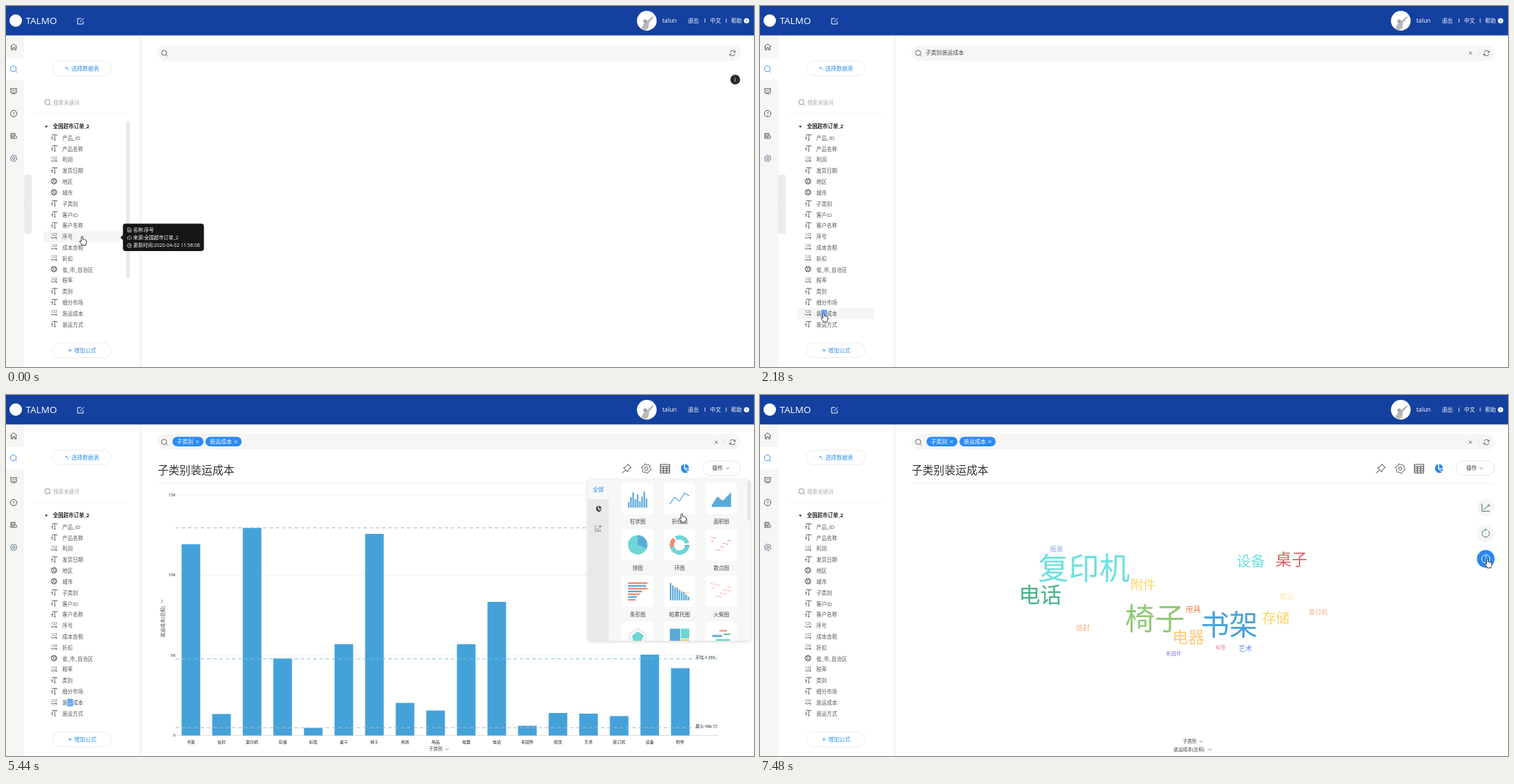
Write an HTML page that moves like this. It is 1076 by 520 pixels and loops after 7.87 s.

```html
<!DOCTYPE html>
<html>
<head>
<meta charset="utf-8">
<style>
html, body { margin: 0; width: 100%; height: 100%; overflow: hidden; background: #fff; }
svg { display: block; width: 100%; height: 100%; }
text { font-family: 'Open Sans', 'Noto Sans CJK SC', 'Noto Sans CJK', sans-serif; white-space: pre; }
</style>
</head>
<body>
<svg id="stage" viewBox="0 0 1076 520" preserveAspectRatio="none"></svg>
<script>
const LOOP = 7870, BLUE = '#2a86f0', BAR = '#45a2d9', INK = '#444', PALE = '#f7f6f5';

// Markup helpers; text is placed by its visual middle.
const text = (x, y, s, size, fill = '#333', extra = '') =>
  `<text x="${x}" y="${y + size * .37}" font-size="${size}" fill="${fill}" ${extra}>${s}</text>`;
const mid = (x, y, s, size, fill, extra = '') => text(x, y, s, size, fill, 'text-anchor="middle" ' + extra);
const rect = (x, y, w, h, fill, r = 0, extra = '') =>
  `<rect x="${x}" y="${y}" width="${w}" height="${h}" rx="${r}" fill="${fill}" ${extra}/>`;
const circle = (x, y, r, fill, extra = '') => `<circle cx="${x}" cy="${y}" r="${r}" fill="${fill}" ${extra}/>`;
const line = (d, color = INK, w = .9, extra = '') =>
  `<path d="${d}" fill="none" stroke="${color}" stroke-width="${w}" ${extra}/>`;
const shape = (d, fill) => `<path d="${d}" fill="${fill}"/>`;
const at = (x, y, body) => `<g transform="translate(${x} ${y})">${body}</g>`;
const group = (id, body, extra = '') => `<g id="${id}" ${extra}>${body}</g>`;
const range = n => [...Array(n).keys()];
const polar = (r, a) => `${(r * Math.cos(a)).toFixed(2)} ${(r * Math.sin(a)).toFixed(2)}`;
const arc = (r, a, b, color, w) => line(`M${polar(r, a)}A${r} ${r} 0 ${b - a > Math.PI ? 1 : 0} 1 ${polar(r, b)}`, color, w);

// Icons, all centred on 0,0
const lens = (c, r = 3.7) => circle(-.5, -.5, r, 'none', `stroke="${c}" stroke-width=".9"`) + line(`M${r * .65} ${r * .65}l2 2`, c);
const gear = (r, c = INK) => {
  const pts = range(24).map(i => polar(i % 4 < 2 ? r : r * .8, (i + .5) * Math.PI / 12));
  return line('M' + pts.join('L') + 'Z', c) + circle(0, 0, r * .35, 'none', `stroke="${c}" stroke-width=".9"`);
};
const help = (r, c, w = .9) => circle(0, 0, r, 'none', `stroke="${c}" stroke-width="${w}"`) + mid(0, 0, '?', r * 1.5, c);
const cross = (c, r = 2) => line(`M${-r} ${-r}L${r} ${r}M${r} ${-r}L${-r} ${r}`, c, .8);
const chevron = line('M-2.5 -1.2L0 1.2L2.5 -1.2', '#555', .7);
const reload = (r, c) => arc(r, -.7, 4.7, c, 1) + line(`M${-r * .1} ${-r * 1.3}l2.2 1.4l-2.4 1.2`, c, .8);
const refresh = arc(3.8, -2.8, -.3, INK, .8) + arc(3.8, .3, 2.8, INK, .8) +
  line('M3.9 -3.6v2.5h-2.4M-3.9 3.6v-2.5h2.4', INK, .8);
const pie = (r, c) => shape(`M-.6 .6V${-r}A${r} ${r} 0 1 0 ${r * .75} ${r * .8}Z`, c) +
  shape(`M.8 -.6V${-r}A${r} ${r} 0 0 1 ${r} -.6Z`, c) + shape(`M1 .8H${r}A${r} ${r} 0 0 1 ${r * .8} ${r * .6}Z`, c);
const kinds = {
  T: line('M-2.2 -2.4V-3.8H4.4V-2.4M1.2 -3.8V3.9M-.2 3.9H2.6M-4.3 -.1H-1.1M-2.7 -.1V3.9', '#444', .8),
  M: text(-4.2, -2, '123', 5, '#444') + line('M-4 .8Q-3.6 3.6 -1 2.6T4 2.4M2.4 .9L4.1 2.4L2.6 4.2', '#444', .8),
  G: circle(0, 0, 4, 'none', 'stroke="#444" stroke-width=".9"') +
    line('M-3.6 -1.5L-1 -2.4L0 0L-2 1.2L-1.3 3.7M1 -3.8L1.2 -1.6L3.7 -.8M3.6 1.4L1.2 1L.8 3.6', '#444', .8)
};

const fields = '产品_ID 产品名称 利润 发货日期 地区 城市 子类别 客户ID 客户名称 序号 成本含税 折扣 省_市_自治区 税率 类别 细分市场 装运成本 装运方式'.split(' ');
const fieldKinds = 'TTMTGGTTTMMMGMTTMT';
const rowY = i => 190 + i * 15.82;

const header = rect(0, 0, 1076, 42.4, '#14419f') + circle(14, 21, 9, '#fff') +
  text(28.5, 21.5, 'TALMO', 13.5, '#fff') +
  line('M108 18H103V26H111V22M106.5 23L112 17.5', '#fff', 1) +
  circle(921.8, 21.2, 14.2, '#fff') + shape('M914 32L917 26L922 22L930 15L932 16L925 24L924 32L919 35Z', '#b9b9b9') +
  circle(919.5, 22, 2.8, '#a5a5a5') +
  text(944, 21, 'talun', 8.8, '#fff') + text(981, 21.3, '退出', 7.7, '#fff') + text(1013, 21.3, '中文', 7.7, '#fff') +
  text(1043, 21.3, '帮助', 7.7, '#fff') + line('M1005.5 18V24M1036 18V24', '#fff', .8) +
  circle(1065.3, 21.3, 3.8, '#fff') + mid(1065.3, 21.3, '?', 6, '#14419f');

const rail = rect(0, 42, 26, 478, PALE) + rect(0, 75, 26, 32, '#fff') +
  at(11, 59, line('M-4.5 -.5L0 -4.5L4.5 -.5M-3.5 -1V4.2H-1.3V1H1.3V4.2H3.5V-1')) +
  at(11, 91, lens(BLUE, 4.2)) +
  at(11, 123, line('M-4.8 -4H4.8M-4 -4V2.2H4V-4M-2 4.5L0 2.2L2 4.5M-2.3 0L-.5 -1.6L.8 -.3L2.4 -1.8')) +
  at(11, 155, help(4.6, INK)) +
  at(11, 187, line('M-4 -3.5H2V-.5M-4 -3.5V3.8H0M-4 -1H1M-4 1.4H0') + circle(2.3, 2, 2.1, 'none', 'stroke="#444" stroke-width=".9"')) +
  at(11, 219.5, gear(4.8, '#46617c'));

const side = rect(192, 42, 3, 478, '#f4f4f4') +
  group('handle', rect(26, 243, 11, 85, '#ebebeb', 3) + line('M33.5 282.5L31 285.5L33.5 288.5', '#fff', 1)) +
  [[79.5, '选择数据表', 94], [485.5, '增加公式', 98]].map(([y, s, x]) =>
    rect(66.5, y, 85, 21, '#fff', 10.5, 'stroke="#ededed"') + text(x, y + 10.5, s, 8, '#2f8fe8')).join('') +
  line('M86 88.3L90.5 92.2M86 88.3V90.4M86 88.3H88.2M89.5 496H94.5M92 493.5V498.5', '#2f8fe8', .8) +
  at(60, 139, lens('#8a8078')) + text(68, 139, '搜索关键词', 7.5, '#aaa') +
  line('M40 154.5H176', '#f5f5f5', 1) +
  group('thumb', rect(173, 166, 5, 226, '#e9e9e9', 1.5)) +
  shape('M56 172.6H60L58 175.6Z', '#222') + text(67.5, 173.5, '全国超市订单_2', 7.5, '#222', 'font-weight="bold"') +
  '<rect id="hover" x="54" width="110" height="16" fill="#f5f5f5"/>' +
  fields.map((s, i) => at(69, rowY(i) - .8, kinds[fieldKinds[i]]) + text(81, rowY(i), s, 7.5, '#555')).join('') +
  [[6, 0], [16, 1]].map(([r, c]) => group('sel' + r,
    rect(81 + c * 7.5, rowY(r) - 5.3, 7.5, 10.5, '#3389fb') + text(81 + c * 7.5, rowY(r), fields[r][c], 7.5, '#fff'))).join('');

const pill = (x, w, s) => rect(x, 60.3, w, 13.7, '#2a8bf3', 6.8) + text(x + 6, 67.3, s, 8, '#fff', 'font-weight="500"') +
  at(x + w - 8.6, 67.3, cross('#fff'));
const search = rect(218, 56, 839, 23, '#f7f6f5', 11.5) + at(228, 68, lens('#555')) + at(1045, 68, refresh) +
  group('clear', at(1022, 68, cross('#555', 2.3)) + line('M1033.5 64V72', '#ddd')) +
  group('pill1', pill(239.5, 44.5, '子类别')) + group('pill2', pill(287, 52, '装运成本')) +
  text(238, 67.5, '', 7.9, '#444', 'id="query"') +
  group('info', circle(1049, 106, 7, '#252a2f') + mid(1049, 106, 'i', 9, '#fff'));

const spinner = group('loading',
  at(665.5, 302, group('ring', arc(17.3, -2.5, -1.15, '#f7c1c6', 1.2) + arc(17.3, -.45, .75, '#a5dfe4', 1.2) + arc(17.3, 1.65, 3.05, '#a4e0d8', 1.2))) +
  mid(665.5, 333, '查询数据中', 8, '#333') + mid(665.5, 345, '...', 8, '#333'));

const toolbar = group('tools', text(218, 108, '子类别装运成本', 15.8, '#333') + line('M218 127H1057', '#f3f3f3', 1) +
  at(893, 106, line('M1.5 -6.5L6.5 -1.5L5 -1L2 2.3L1.5 4.8L-4.8 -1.5L-2.3 -2L1 -5ZM-1.8 1.8L-6.5 6.5', INK, 1)) +
  at(921, 106, gear(6.8)) +
  at(948, 106, line('M-6.7 -6H6.7V6.3H-6.7ZM-6.7 -3H6.7M-6.7 0H6.7M-6.7 3.2H6.7M-2.3 -3V6.3M2.3 -3V6.3', INK, 1)) +
  at(976, 106, pie(6.5, BLUE)) +
  rect(1001.5, 95, 55, 21, '#fff', 10.5, 'stroke="#e6e6e6"') + text(1016, 105.3, '操作', 7.5) + at(1038, 105.5, chevron) +
  [162, 199, 236].map((y, i) => circle(1044, y, 12.7, PALE, `id="btn${i}"`)).join('') +
  group('axisIcon', at(1044, 162, line('M-5.5 -5.5V5.3H6M-3 3L5 -3.5M2.6 -3.7H5.2V-1.2', 'currentColor', 1)) +
    at(1044, 199.5, reload(5.3, 'currentColor'))) +
  group('helpIcon', at(1044, 236, help(6, 'currentColor', 1))));

const cats = '书架 信封 复印机 存储 标签 桌子 椅子 用具 用品 电器 电话 系固件 纸张 艺术 装订机 设备 附件'.split(' ');
const heights = [275.5, 31, 299, 111, 11, 131.5, 290.5, 47, 36, 131.5, 192.5, 14, 32.5, 31.5, 28, 116.5, 97];
const ref = (y, s, c) => line(`M244 ${y}H1025`, c, 1, 'stroke-dasharray="5 4"') + text(992, y - 2, s, 5.8, '#222');
const chart = group('chart',
  ['15K', '10K', '5K', '0'].map((s, i) => line(`M246 ${144 + i * 115.5}H1025`, i < 3 ? '#f1f1f1' : '#ddd', 1) +
    text(244, 143.5 + i * 115.5, s, 6, '#222', 'text-anchor="end"')).join('') +
  cats.map((s, i) => `<rect class="bar" x="${252.6 + i * 44}" width="26.8" fill="${BAR}"/>` + mid(266 + i * 44, 500, s, 6, '#222')).join('') +
  ref(191.3, '最大 12.95K', '#9fb9c4') + ref(380, '平均 4.78K', '#7fbfe0') + ref(479.2, '最小 486.77', '#a9b9c4') +
  text(0, 0, '装运成本(总和)', 6.8, '#444', 'transform="translate(225 349) rotate(-90)"') + line('M223 294.7L225.8 297L223 299.3', '#666', .8) +
  text(608, 510, '子类别', 6.7, '#444') + at(634.5, 510, chevron));

const words = [['复印机', 466, 250, 44, '#6ee0df'], ['电话', 403, 287.3, 30.8, '#43b384'], ['椅子', 568, 322.5, 43, '#92c97a'],
  ['书架', 675, 331, 41, '#45a2d9'], ['桌子', 764.5, 236.5, 23, '#e05a62'], ['设备', 706, 239, 20.5, '#6ee0df'],
  ['附件', 551, 273.5, 18.3, '#ffd562'], ['存储', 742, 321.5, 20, '#fdd46c'], ['电器', 616, 348, 23, '#fdc97c'],
  ['纸张', 426.5, 221.5, 9.6, '#8b97e8'], ['用具', 623, 309, 11.3, '#f28b4d'], ['用品', 758, 290, 10.4, '#fbe3a8'],
  ['装订机', 803, 312.5, 9.2, '#f8a58b'], ['信封', 464.5, 335, 9.8, '#f7a570'], ['标签', 663, 363, 7, '#dc70ad'],
  ['系固件', 595, 372.5, 7.4, '#8676e2'], ['艺术', 698, 365.5, 9.8, '#5d87da']];
const cloud = group('cloud', words.map(([s, x, y, size, c]) => mid(x, y, s, size, c)).join('')) +
  group('legend', text(608, 499, '子类别', 6.7, '#444') + at(634.5, 499, chevron) +
    text(595, 510.5, '装运成本(总和)', 6.7, '#444') + at(647, 510.5, chevron));

// Chart picker
const C = ['#5aaad8', '#ef8a72', '#6ed6d6', '#f5cf6a', '#d8577d', '#63bd8c'];
const dots = (n, cols) => range(n).map(i => circle((i * 17.3) % 28 - 14, (i * 8.9) % 22 - 11, .8, cols[i % cols.length])).join('');
const columns = f => range(9).map(i => rect(-14 + i * 3.2, 13 - f(i), 2.2, f(i), C[0])).join('');
const ringOf = (r, w, n) => range(n).map(i => arc(r, i * 2 * Math.PI / n, (i + .9) * 2 * Math.PI / n, C[i % 6], w)).join('');
const types = [
  ['柱状图', columns(i => 8 + i * 7 % 17)],
  ['折线图', line('M-14 8L-7 -2L0 4L7 -8L14 -4', C[0], 1.2)],
  ['面积图', shape('M-14 10L-6 -3L2 3L14 -9V12H-14Z', C[0])],
  ['饼图', circle(0, 0, 14, C[2]) + shape('M0 0V-14A14 14 0 0 1 13 5Z', C[0])],
  ['环图', ringOf(11, 6, 3) + arc(11, .2, 2.9, C[2], 6)],
  ['散点图', dots(14, [C[1], C[4]])],
  ['条形图', range(7).map(i => rect(-14, -13 + i * 4, [28, 26, 28, 20, 17, 13, 11][i], 2.4, C[i % 2 ? 0 : 1])).join('')],
  ['帕累托图', columns(i => 25 - i * 2.2 - (i % 3)) + line('M-13 -10Q-3 0 14 3', '#eab48c', .8)],
  ['火柴图', dots(22, [C[1], '#eebd9c'])],
  ['雷达图', line('M0 -14L13 -4L8 11H-8L-13 -4Z', '#ccc') + shape('M0 -9L9 -3L4 7L-6 8L-8 -3Z', C[2])],
  ['矩形树图', rect(-14, -13, 15, 26, C[0]) + rect(2, -13, 12, 14, C[2]) + rect(2, 2, 12, 11, C[3])],
  ['词云图', rect(-13, -4, 14, 3, C[0]) + rect(3, -6, 10, 2, C[5]) + rect(-8, 2, 20, 3, C[2]) + rect(-3, -11, 11, 2, C[1])],
  ['瀑布图', range(9).map(i => rect(-15 + i * 3.4, 12 - i * i * .35, 2.4, 2 + i * .3, C[0])).join('')],
  ['旭日图', ringOf(11.5, 5, 14)],
  ['打包图', circle(0, 0, 14, '#fff', 'stroke="#cde5f1"') + [[-5, -3, 6.8, 0], [6, -3, 4.2, 1], [2, 6, 3.3, 3], [8, 5, 3, 2], [-5, 8, 2.5, 4], [3, -9, 2, 2]]
    .map(([x, y, r, c]) => circle(x, y, r, C[c])).join('')]
];
const picker = group('picker', rect(837, 122, 233.5, 232, '#f7f7f7', 5, 'filter="url(#shadow)"') +
  shape('M837 150H867V354H842Q837 354 837 349Z', '#e9e9e9') + mid(852, 136, '全部', 8, BLUE) +
  at(852, 164, pie(4.6, '#333')) + at(852, 192, line('M-4.3 -4.3V4.3H4.3M-2 4V0M.5 4V-1M3 4V1M-2 -3H0', '#999', 1) + circle(2.7, -2.7, 1.7, '#999')) +
  '<g clip-path="url(#view)">' + group('grid', types.map(([s, icon], i) => {
    const x = 908.7 + i % 3 * 60.2, y = 135 + Math.floor(i / 3) * 66.8;
    return rect(x - 22.5, y, 45, 45, '#fff', 3) + at(x, y + 22.5, icon) + mid(x, y + 55.5, s, 7.5, '#444');
  }).join('')) + '</g>' + '<rect id="bar" x="1066.5" width="4" height="57" rx="2" fill="#e4e4e4"/>');

const rule = (x, y, a) => rect(x, y, 136, 28, '#151617', 4) + shape(`M${a - 4} ${y}L${a} ${y - 4}L${a + 4} ${y}Z`, '#151617') +
  text(x + 5, y + 8.5, '搜索结果中至少一个属性列和一个数值列,', 6.7, '#fff') + text(x + 5, y + 20, '且数量不能超过100', 6.7, '#fff');
const tips = '<g font-weight="500">' +
  group('tip', rect(168.2, -19, 116.5, 39.6, '#151617', 4) + shape('M168.5 -3L164.5 1L168.5 5Z', '#151617') +
    text(183, -10, '', 7, '#fff', 'id="tipName"') + text(183, 1.2, '来源:全国超市订单_2', 7, '#fff') +
    text(183, 12.5, '更新时间:2020-04-02 11:58:08', 7, '#fff') +
    line('M175 -12.8H178.5L180 -11V-7H175ZM176.3 -10H178.7M176.3 -8.5H178.7M176 3.4H175.6A1.7 1.7 0 0 1 175.8 .2A2 2 0 0 1 179.5 .2A1.7 1.7 0 0 1 179.5 3.4H179M177.5 1.5V4.5', '#fff', .7) +
    circle(177.5, 12.7, 2.9, 'none', 'stroke="#fff" stroke-width=".7"') + line('M177.5 11V12.9H179', '#fff', .7)) +
  group('pieTip', rect(956.5, 72, 38, 17.5, '#151617', 4) + shape('M971.5 89.5H979.5L975.5 93.5Z', '#151617') + mid(975.5, 80.8, '图形转换', 7, '#fff')) +
  group('rule1', rule(901, 232, 969)) + group('rule2', rule(938, 299, 1029)) + '</g>';

const cursor = group('cursor',
  group('hand', '<path d="M-1.2 .9Q0 -.8 1.1 .9V4.6Q2.3 3.8 3 5Q4.2 4.3 4.8 5.6Q6.2 5.2 6.2 6.8V9Q6 10.6 5.2 11.5V13H-.7V11.7Q-2.4 9.8 -3.7 7.5Q-3.4 5.8 -1.2 7.6Z" fill="#fff" stroke="#222" stroke-width=".9"/>') +
  group('arrow', '<path d="M0 0V9.5L2.2 7.5L3.8 11L5.3 10.3L3.8 7H6.7Z" fill="#fff" stroke="#222" stroke-width=".8"/>'));

document.getElementById('stage').innerHTML =
  '<defs><clipPath id="view"><rect x="867" y="122" width="203" height="232"/></clipPath>' +
  '<filter id="shadow"><feDropShadow dx="0" dy="1" stdDeviation="2.5" flood-opacity=".18"/></filter></defs>' +
  rect(0, 0, 1076, 520, '#fff') + rail + side + header + search + spinner + toolbar + chart + cloud + picker + tips + cursor;

const el = {};
document.querySelectorAll('[id]').forEach(e => el[e.id] = e);
const bars = document.querySelectorAll('.bar');
const show = (id, on) => el[id].setAttribute('visibility', on ? 'visible' : 'hidden');
const move = (id, x, y) => el[id].setAttribute('transform', `translate(${x} ${y})`);
const part = (t, a, b) => Math.min(1, Math.max(0, (t - a) / (b - a)));
const smooth = u => u * u * (3 - 2 * u);

const path = [[0, 109.5, 331.5], [80, 109.5, 331.5], [440, 85, 284.5], [1250, 85, 284.5], [1640, 91.5, 442], [2590, 91.5, 442],
  [3140, 448.5, 366], [3600, 760, 215], [3770, 790, 200], [4300, 975.5, 108.5], [5130, 975.5, 108.5],
  [5500, 972, 175], [6150, 972, 193], [6380, 972, 193], [6850, 1046.5, 236], [LOOP, 1046.5, 236]];
function pointer(t) {
  const i = path.findIndex(k => k[0] > t), [a, x, y] = path[i - 1], [b, p, q] = path[i];
  const u = smooth(part(t, a, b));
  return [x + (p - x) * u, y + (q - y) * u];
}

function draw(t) {
  const [x, y] = pointer(t), inside = x < 164;
  move('cursor', x, y);
  const hand = inside || t > 4180;
  show('hand', hand);
  show('arrow', !hand);

  const row = Math.round((y - 190) / 15.82);
  show('hover', inside);
  el.hover.setAttribute('y', rowY(row) - 8);
  show('tip', inside && (t < 790 || t > 1250 && t < 1880));
  move('tip', 0, rowY(row));
  el.tipName.textContent = '名称:' + (fields[row] || '');
  show('thumb', t < 1000);
  show('handle', t < 2800);
  show('sel6', t >= 790 && t < 1880);
  show('sel16', t >= 1880 && t < 7000);

  show('info', t < 790);
  show('clear', t >= 790);
  show('pill1', t >= 1200 && t < 1880 || t >= 2700);
  show('pill2', t >= 2700);
  el.query.textContent = t >= 790 && t < 1200 ? '子类别' : t >= 1880 && t < 2700 ? '子类别装运成本' : '';
  show('loading', t >= 1200 && t < 1880 || t >= 2700 && t < 2980);
  el.ring.setAttribute('transform', `rotate(${(t - 1720) * .3})`);

  const clouded = t >= 7150;
  show('tools', t >= 2980);
  show('chart', t >= 2980 && !clouded);
  const grow = 1 - (1 - part(t, 3017, 4017)) ** 3;
  bars.forEach((b, i) => {
    b.setAttribute('y', 490.5 - heights[i] * grow);
    b.setAttribute('height', heights[i] * grow);
  });
  show('legend', clouded);
  el.cloud.setAttribute('opacity', part(t, 7250, 7470));
  el.btn2.setAttribute('fill', clouded ? BLUE : PALE);
  el.axisIcon.setAttribute('color', clouded ? '#3c7a58' : INK);
  el.helpIcon.setAttribute('color', clouded ? '#fff' : INK);

  show('picker', t >= 4740 && !clouded);
  const scroll = 114 * smooth(part(t, 5350, 5900));
  move('grid', 0, -scroll);
  el.bar.setAttribute('y', 122 + scroll * .246);
  show('pieTip', t >= 4300 && t < 5200);
  show('rule1', t >= 6100 && t < 6480);
  show('rule2', t >= 6750 && !clouded);
}

const start = performance.now();
function tick() {
  draw((performance.now() - start) % LOOP);
  requestAnimationFrame(tick);
}
tick();
</script>
</body>
</html>
```
